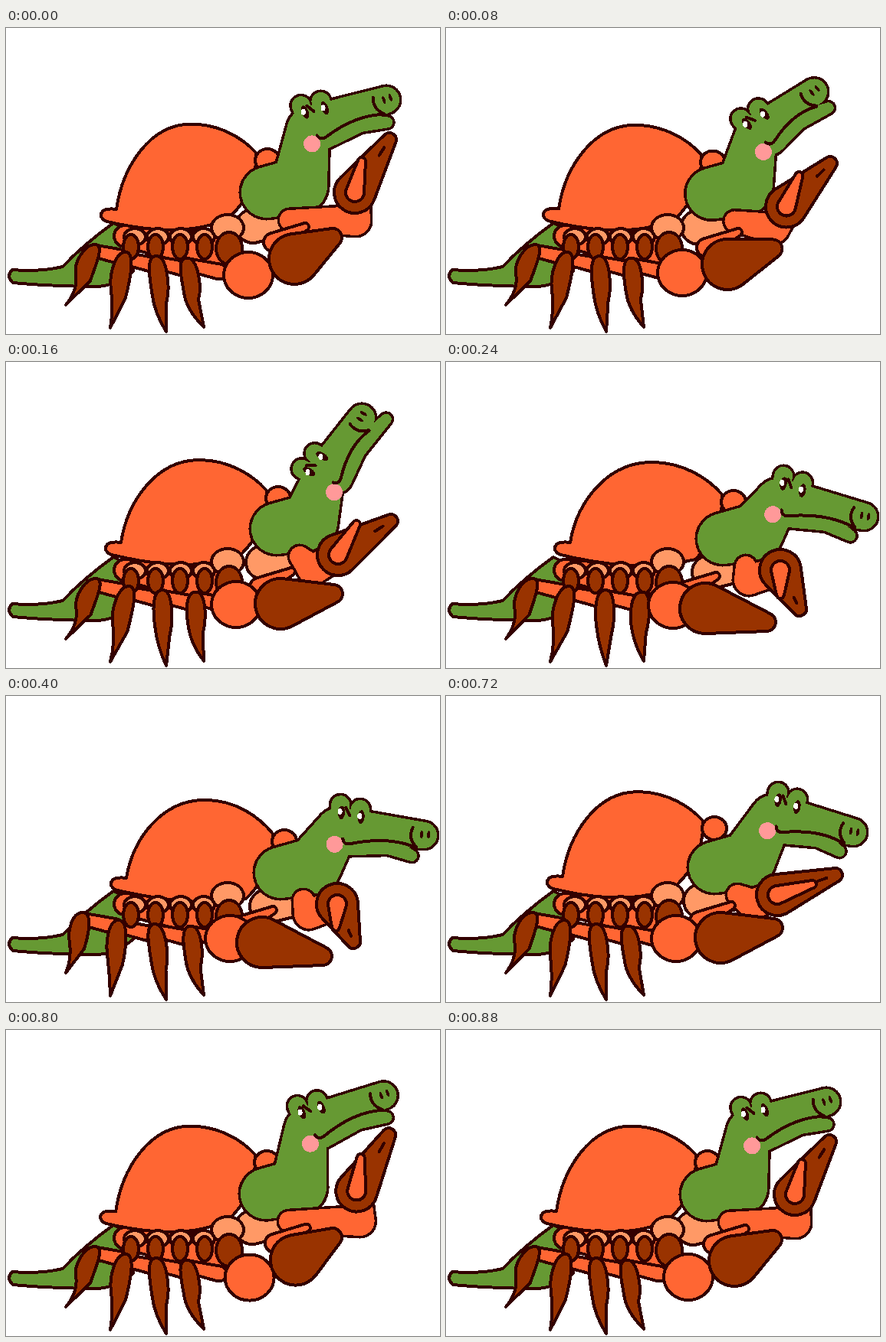
An HTML page for the animation above (0.96 s loop, 566 px wide and 400 px high).

```html
<!DOCTYPE html>
<html lang="en">
<head>
<meta charset="utf-8">
<title>Crab-gator</title>
<style>
html, body { margin: 0; width: 100%; height: 100%; overflow: hidden; background: #fff; }
svg { display: block; width: 100vw; height: 100vh; }
g { stroke: #300; stroke-width: 4; stroke-linejoin: round; stroke-linecap: round; shape-rendering: crispEdges; }
.plain { stroke: none; }
.rim { stroke-width: 7; }
</style>
</head>
<body>
<svg viewBox="0 0 566 400" id="stage"></svg>
<script>
const ORANGE = '#f63', GREEN = '#693', BROWN = '#930', LIGHT = '#f96', PINK = '#f99', DARK = '#300';

// Joints of each key pose. "legs" is the first leg's x and the spacing.
const raised = {
  head: [394, 132], nose: [496, 94], neck: [340, 215], lip: [124, 243], collar: [326, 163],
  elbow: [456, 252], hand: [455, 215], tip: [500, 146], thumb: [464, 174],
  nearElbow: [316, 323], claw: [376, 302], clawTip: [426, 274], legs: [116, 40]
};
const thrownBack = {
  head: [412, 158], nose: [464, 73], neck: [353, 218], lip: [130, 242], collar: [340, 168],
  elbow: [400, 272], hand: [433, 252], tip: [502, 208], thumb: [457, 212],
  nearElbow: [300, 317], claw: [358, 316], clawTip: [427, 303], legs: [117, 43.5]
};
const drooping = {
  head: [432, 180], nose: [545, 202], neck: [361, 231], lip: [142, 242], collar: [360, 173],
  elbow: [395, 285], hand: [436, 272], tip: [461, 323], thumb: [436, 304],
  nearElbow: [296, 318], claw: [338, 322], clawTip: [418, 340], legs: [113, 47.5]
};
const resting = {
  head: [432, 174], nose: [545, 182], neck: [358, 231], lip: [137, 244], collar: [348, 180],
  elbow: [395, 285], hand: [432, 272], tip: [453, 321], thumb: [430, 302],
  nearElbow: [292, 317], claw: [334, 322], clawTip: [413, 340], legs: [100, 47]
};
const rising = {
  ...thrownBack, head: [425, 157], nose: [531, 178], neck: [350, 224], lip: [132, 242], collar: [335, 163],
  hand: [432, 260], tip: [508, 234], thumb: [478, 246], legs: [113, 41.5]
};

const mix = (a, b, k) => a.map((v, i) => v + (b[i] - v) * k);
const add = ([x, y], dx, dy) => [x + dx, y + dy];
const blend = (a, b, k) =>
  Object.fromEntries(Object.keys(a).map(joint => [joint, mix(a[joint], b[joint], k)]));

// start time and pose; the blend above 1 overshoots
const steps = [
  [0, raised], [80, blend(raised, thrownBack, .5)], [160, thrownBack], [240, drooping],
  [320, blend(drooping, resting, .5)], [400, resting], [720, rising], [800, blend(rising, raised, 1.1)],
  [880, raised]
];
const LOOP = 960;

const path = (d, fill = 'none', cls = '') => `<path d="${d}" fill="${fill}" class="${cls}"/>`;
const oval = ([x, y], rx, ry, fill, cls = '', turn = 0) =>
  `<ellipse cx="${x}" cy="${y}" rx="${rx}" ry="${ry}" fill="${fill}" class="${cls}" transform="rotate(${turn} ${x} ${y})"/>`;
const plain = (c, rx, ry, fill, turn) => oval(c, rx, ry, fill, 'plain', turn);

// Outline around two circles.
function taper(a, ra, b, rb) {
  const dx = b[0] - a[0], dy = b[1] - a[1];
  const dir = Math.atan2(dy, dx);
  const open = Math.acos((ra - rb) / Math.max(Math.hypot(dx, dy), Math.abs(ra - rb) + .1));
  const on = (c, r, angle) => `${c[0] + r * Math.cos(angle)} ${c[1] + r * Math.sin(angle)}`;
  return `M${on(a, ra, dir - open)}L${on(b, rb, dir - open)}` +
    `A${rb} ${rb} 0 ${+(open > Math.PI / 2)} 1 ${on(b, rb, dir + open)}` +
    `L${on(a, ra, dir + open)}A${ra} ${ra} 0 ${+(open < Math.PI / 2)} 1 ${on(a, ra, dir - open)}Z`;
}

// Several shapes merged inside one outline.
const union = (shapes, fill) =>
  path(shapes.join(''), fill, 'rim') + path(shapes.join(''), fill, 'plain');

const tail = () => path('M8 316Q45 319 74 312Q100 284 140 255L170 270L166 318Q140 340 110 338Q50 337 9 333Q0 324 8 316Z', GREEN);

function shell({ lip, collar }) {
  const corner = add(lip, 20, -6), peak = add(mix(lip, collar, .58), 0, -71);
  const left = (x, y) => [corner[0] + (peak[0] - corner[0]) * x, corner[1] + (peak[1] - corner[1]) * y];
  const right = (x, y) => [peak[0] + (collar[0] - peak[0]) * x, peak[1] + (collar[1] - peak[1]) * y];
  return path(`M${corner}C${left(.08, .5)} ${left(.45, 1)} ${peak}` +
    `C${right(.45, 0)} ${right(.8, .5)} ${collar}Q${add(collar, 2, 50)} ${add(collar, -35, 85)}` +
    `Q${lip[0] + 110} 277 ${add(lip, 8, 10)}C${add(lip, -3, 8)} ${add(lip, -6, -10)} ${corner}Z`, ORANGE) +
    oval(add(collar, 15, 10), 16, 15, ORANGE);
}

function farArm({ neck, elbow, hand, tip, thumb }) {
  return union([taper(add(neck, 30, 36), 13, elbow, 19), taper(elbow, 19, hand, 18)], ORANGE) +
    path(taper(hand, 27, tip, 9), BROWN) +
    path(taper(hand, 12, thumb, 5), ORANGE) +
    path(`M${mix(hand, tip, .7)}L${mix(hand, tip, .85)}`);
}

function head({ head, nose, neck }) {
  const dx = nose[0] - head[0], dy = nose[1] - head[1], len = Math.hypot(dx, dy);
  const [ux, uy] = [dx / len, dy / len], turn = Math.atan2(dy, dx) * 180 / Math.PI;
  const at = (x, y) => add(head, ux * x - uy * y, uy * x + ux * y);
  const throat = add(neck, 43, -9);
  const jaw = at(len * .6, 16), slide = 40 * uy * uy - 14; // the jaw juts out as the head tips back
  const eyes = [[2, -32], [28, -28]];
  const shapes = [
    taper(neck, 33, throat, 36), taper(throat, 36, head, 27),
    taper(at(8, -5), 23, nose, 17),
    taper(at(16, 13), 20, jaw, 12), taper(jaw, 12, at(len + slide, 28), 7),
    ...eyes.map(([x, y]) => taper(at(x, y), 12, at(x, y + 14), 12))
  ];
  return union(shapes, GREEN) +
    plain(at(-2, 20), 11, 11, PINK) +
    path(`M${at(8, 12)}Q${at(10, 20)} ${at(18, 18)}Q${at(len * .6, 4)} ${at(len - 9, 17)}`) +
    path(`M${at(len - 15, -9)}Q${at(len - 21, 5)} ${at(len - 9, 16)}`) +
    path(`M${at(9, -29)}L${at(15, -19)}`) +
    eyes.map(([x, y]) => plain(at(x + 2, y + 10), 4.5, 9, DARK, turn) + plain(at(x, y + 9), 3, 4, '#fff')).join('') +
    [-3, 6].map(x => plain(at(len + x, -1), 2, 5, DARK, turn)).join('');
}

// A pointed leg, slightly bent at its middle.
function leg([x, y], [tipX, tipY], bend) {
  const h = tipY - y, midX = (x + tipX) / 2 + bend;
  return path(`M${x} ${y}C${x + 14} ${y} ${midX + 14} ${y + h * .4} ${midX + 9} ${y + h * .6}L${tipX} ${tipY}` +
    `Q${midX - 7} ${y + h * .75} ${midX - 10} ${y + h * .5}C${midX - 13} ${y + h * .3} ${x - 14} ${y} ${x} ${y}Z`, BROWN);
}

function legs({ legs: [first, gap] }) {
  const tips = [[78, 362], [136, 392], [209, 397], [258, 391]];
  const tops = tips.map((_, i) => [first + gap * i, 303 - 20 * .5 ** i]);
  const row = draw => tops.map(draw).join('');
  return row(top => path(taper(add(top, 2, 9), 8, add(top, 42, 18), 10), ORANGE)) +
    row((_, i) => oval([168 + 30 * i, 273], 14, 11, LIGHT)) +
    row((_, i) => oval([163 + 32 * i, 286], 10, 16, BROWN)) +
    row((top, i) => leg(top, tips[i], 4 - 3 * i));
}

function nearArm({ nearElbow, claw, clawTip }) {
  return oval([289, 261], 21, 17, LIGHT) + oval([291, 288], 17, 21, BROWN) +
    path(taper(add(claw, -28, -22), 12, add(claw, 14, -42), 5), ORANGE) +
    oval(nearElbow, 32, 30, ORANGE) +
    path(taper(claw, 33, clawTip, 12), BROWN);
}

function drawPose([, pose]) {
  const { neck } = pose;
  const body = path(taper([155, 272], 14, [270, 292], 24), ORANGE);
  const chest = path(taper(add(neck, -18, 44), 22, add(neck, 30, 36), 18), LIGHT);
  return `<g>${tail()}${body}${shell(pose)}${chest}${head(pose)}${farArm(pose)}${legs(pose)}${nearArm(pose)}</g>`;
}

const stage = document.getElementById('stage');
stage.innerHTML = steps.map(drawPose).join('');
const groups = [...stage.children];

const start = performance.now();
function tick() {
  const t = (performance.now() - start) % LOOP;
  const current = steps.findLastIndex(([from]) => t >= from);
  groups.forEach((g, i) => { g.style.display = i === current ? '' : 'none'; });
  requestAnimationFrame(tick);
}
tick();
</script>
</body>
</html>
```
